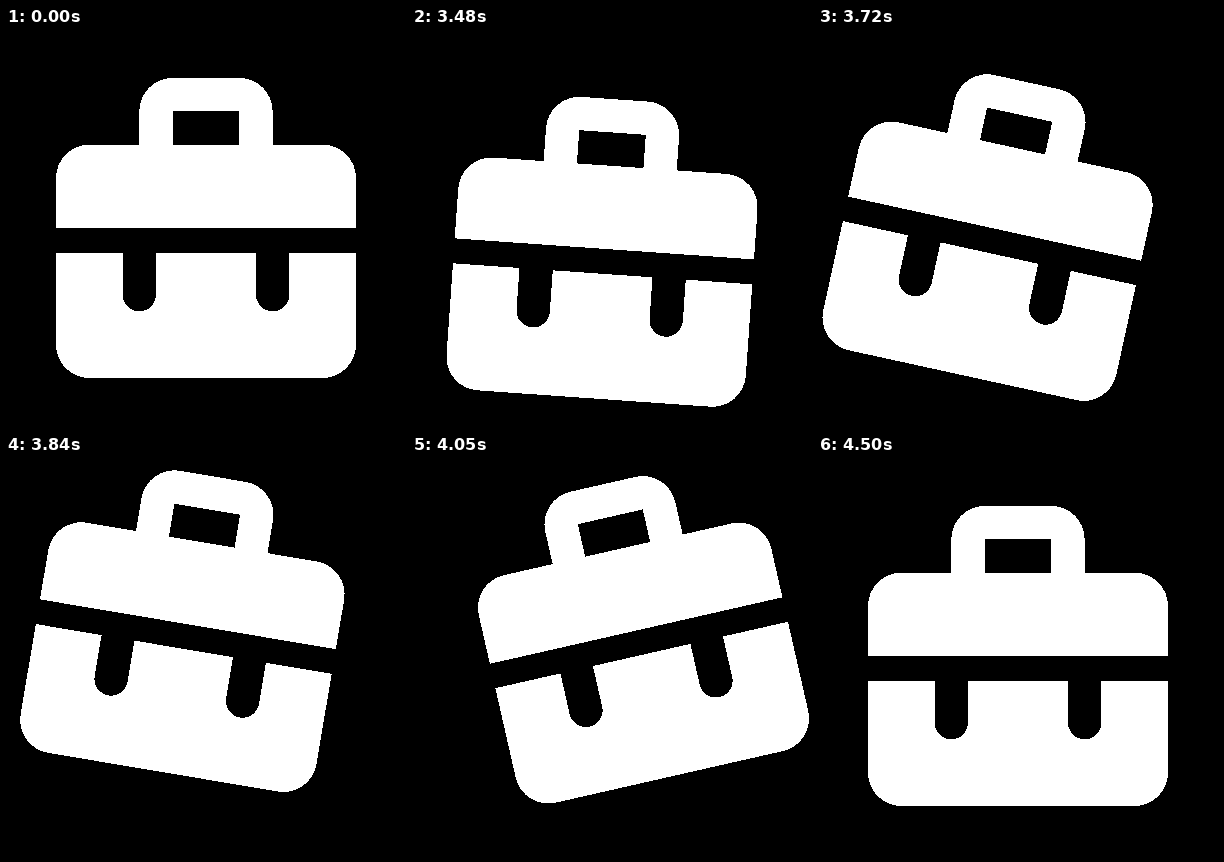
Write an HTML page that moves like this. It is 400 px wide and 400 px high and loops after 4.56 s.

```html
<!DOCTYPE html>
<html lang="en">
<head>
<meta charset="utf-8">
<title>Swinging briefcase</title>
<style>
html, body { margin: 0; height: 100%; overflow: hidden; background: #000; }
svg { display: block; width: 100vw; height: 100vh; }
</style>
</head>
<body>
<svg viewBox="0 0 24 24">
  <g id="bag" fill="#fff" fill-rule="evenodd" shape-rendering="crispEdges">
    <path d="M3 12V9a2 2 0 0 1 2-2h3V5a2 2 0 0 1 2-2h4a2 2 0 0 1 2 2v2h3a2 2 0 0 1 2 2v3zM10 7h4V5h-4z"/>
    <path d="M3 13.5h4V16a1 1 0 0 0 2 0v-2.5h6V16a1 1 0 0 0 2 0v-2.5h4V19a2 2 0 0 1-2 2H5a2 2 0 0 1-2-2z"/>
  </g>
</svg>
<script>
const LOOP = 4560, START = 3300, STEP = 30;
// [time in ms after START, value]
const ANGLE = [[0, 0], [487, 13], [723, -13.8], [941, 10], [1200, 0]];
const LIFT = [[0, 0], [276, 1.76], [620, -2.38], [908, 0]];
const bag = document.getElementById('bag');

function valueAt(keys, t) {
  if (t <= 0) return keys[0][1];
  const i = keys.findIndex(key => key[0] > t);
  if (i < 0) return keys[keys.length - 1][1];
  const [t0, v0] = keys[i - 1], [t1, v1] = keys[i];
  const u = (t - t0) / (t1 - t0);
  return v0 + (v1 - v0) * u * u * (3 - 2 * u);
}

function draw(now) {
  const t = Math.floor(now % LOOP / STEP) * STEP - START;
  bag.setAttribute('transform',
    `translate(0 ${valueAt(LIFT, t)}) rotate(${valueAt(ANGLE, t)} 12 5.46)`);
}

const begin = performance.now();
function tick() {
  draw(performance.now() - begin);
  requestAnimationFrame(tick);
}
tick();
</script>
</body>
</html>
```
